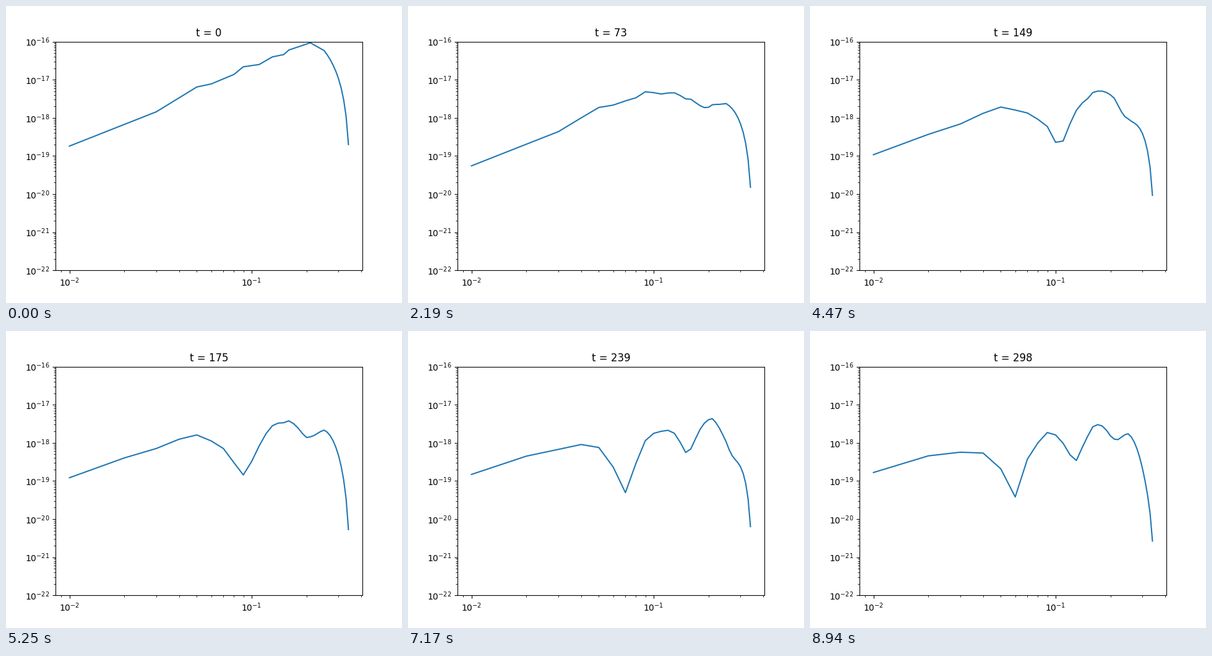
These frames come from a looping animation (640 by 480 pixels, 8.97 s). A matplotlib script:

```python
import matplotlib.pyplot as plt
import numpy as np
from matplotlib.animation import FuncAnimation

FRAMES, STEP_MS = 299, 30
START = 0.635            # clock offset that sets the initial expansion rate
DRIFT = -0.489           # mean initial rate of every mode
SMEAR = (0.95, 1, 1.05)  # wave speeds averaged within one mode

n = np.arange(1, 35)
k = n / 100
speed = 0.0141 * n * np.exp(-n / 76)
spread = np.minimum(0.0042 + 0.009 * n, 0.2)


def initial_spectrum():
    """Bumpy power-law rise, cut off as a power of the distance to mode 35."""
    knots = [1, 3, 5, 6, 8, 9, 11, 13, 15, 16, 21, 25]
    decades = [-2.74, -1.84, -1.19, -1.11, -0.86, -0.66,
               -0.60, -0.40, -0.34, -0.22, -0.03, -0.234]
    rise = np.interp(np.log(n), np.log(knots), decades)
    cutoff = 2.467 * np.log10(35 - n) - 2.70
    return 10 ** (np.minimum(rise, cutoff) - 16)


def bessel_parts(q):
    """Series for J0(2*sqrt(q)) and the regular part of Y0."""
    term, harmonic = np.ones_like(q), 0.0
    j0, rest = np.ones_like(q), np.zeros_like(q)
    for m in range(1, 45):
        term = -term * q / m**2
        harmonic += 1 / m
        j0 = j0 + term
        rest = rest + harmonic * term
    return j0, rest


def spectrum(t):
    """Damped standing waves with a spread of initial rates and speeds."""
    tau, tau0 = (t + START) ** (2 / 3), START ** (2 / 3)
    c = np.outer(SMEAR, speed)
    j0, rest = bessel_parts(c**2 / 4 * (tau**2 - tau0**2))
    kick = np.log(tau / tau0) * j0 - rest
    power = (j0 + DRIFT * kick) ** 2 + (spread * kick) ** 2
    return spectrum0 * power.mean(axis=0)


spectrum0 = initial_spectrum()
fig, ax = plt.subplots(figsize=(6.4, 4.8), dpi=100)
line, = ax.loglog(k, spectrum0)
ax.set_xlim(ax.get_xlim())
ax.set_ylim(1e-22, 1e-16)
title = ax.set_title("t = 0")


def update(t):
    line.set_ydata(spectrum(t))
    title.set_text(f"t = {t}")
    return line, title


anim = FuncAnimation(fig, update, frames=FRAMES, interval=STEP_MS,
                     repeat=True, repeat_delay=0)
plt.show()
```
